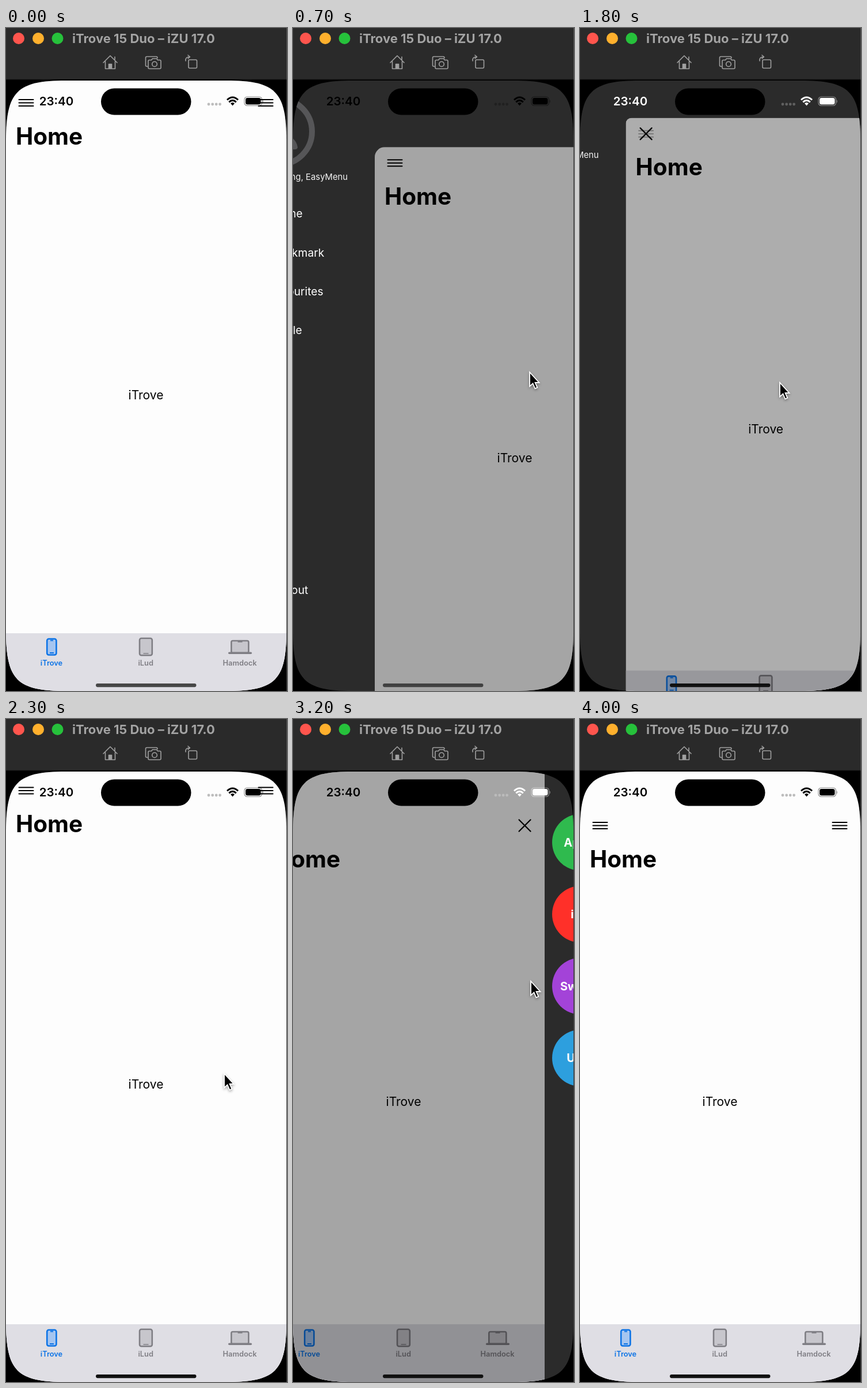
An HTML page that plays this animation: 488 px wide and 1148 px high, repeating every 4.1 s.

```html
<!DOCTYPE html>
<html lang="en">
<head>
<meta charset="utf-8">
<title>Side menu demo</title>
<style>
  html, body { margin: 0; width: 100%; height: 100%; overflow: hidden; background: #000; }
  svg { display: block; font-family: Inter, Roboto, sans-serif; }
  .line { fill: none; stroke-linecap: round; stroke-linejoin: round; }
</style>
</head>
<body>
<svg id="stage" width="488" height="1148" viewBox="0 0 488 1148"></svg>
<script>
const LOOP = 4100, STEP = 100, OPEN = 245, TOP = 91;

// Text placed by the middle of its capitals.
const text = (x, y, size, str, attrs = '') =>
  `<text x="${x}" y="${y + size * .364}" font-size="${size}" ${attrs}>${str}</text>`;
const mid = 'text-anchor="middle"';
const disc = (x, y, r, fill) => `<circle cx="${x}" cy="${y}" r="${r}" fill="${fill}"/>`;
const box = (x, y, w, h, r, attrs = '') =>
  `<rect x="${x}" y="${y}" width="${w}" height="${h}" rx="${r}" ${attrs}/>`;

const windowBar = `
  ${box(0, 0, 488, 89, 0, 'fill="#2a2a2a"')}
  ${box(0, 88.5, 488, 1, 0, 'fill="#1a1a1a"')}
  ${disc(22, 18, 10, '#ff554d')}${disc(56, 18, 10, '#ffb02d')}${disc(89.5, 18, 10, '#26c13b')}
  ${text(115, 18, 22, 'iTrove 15 Duo – iZU 17.0', 'fill="#a3a3a3" font-weight="700"')}
  <g class="line" stroke="#a0a0a0" stroke-width="1.6">
    <path d="M169 60 181 48 193 60M172.500 58V70.500H189.500V58M189 50V55"/>
    <path d="M178.500 70V62.500H183.500V70Z" fill="#a0a0a0"/>
    <path d="M246 66.500H244.500Q242.500 66.500 242.500 64.500V51.500Q242.500 49.500 244.500 49.500H261Q263 49.500 263 52"/>
    <path d="M249 55.500H252.500L254.500 53H261.500L263.500 55.500H267Q269 55.500 269 57.500V68.500Q269 70.500 267 70.500H249Q247 70.500 247 68.500V57.500Q247 55.500 249 55.500Z"/>
    <circle cx="258" cy="62.500" r="4.300"/>
    ${box(317, 55, 14.5, 14.5, 2)}
    <path d="M312 57Q311 50 319 50M316 47 319.500 50 316 53"/>
  </g>`;

const row = (x, y, label) => text(x, y, 19.2, label, 'fill="#fff"');
const leftMenu = `
  <circle cx="79" cy="263" r="57" fill="none" stroke="#565658" stroke-width="10"/>
  <ellipse cx="79" cy="244" rx="15.500" ry="17" fill="#565658"/>
  <path d="M47 290C49 275 64 266.500 79 266.500S109 275 111 290Q111 294 106 294H52Q47 294 47 290Z" fill="#565658"/>
  ${text(16.5, 341.5, 14.8, 'Good Morning, EasyMenu', 'fill="#f4f4f4"')}
  <g fill="#ff3b30">
    <path class="line" d="M21 406 34.500 394.500 48 406" style="stroke:#ff3b30;stroke-width:2.600"/>
    <path d="M24 407 34.500 398 45 407V417Q45 419 43 419H37.500V410H31.500V419H26Q24 419 24 417ZM41 394H45V401L41 398Z"/>
    <path d="M33.300 485V464Q27 459.500 20 463V483Q27 480.500 33.300 485ZM35.200 485V464Q41.500 459.500 48.500 463V483Q41.500 480.500 35.200 485Z"/>
    <path d="M32.300 551C25 546 19.800 541 19.800 535 19.800 527 29 525.500 32.300 532 35.600 525.500 44.800 527 44.800 535 44.800 541 39.600 546 32.300 551Z"/>
    <circle cx="31.500" cy="607" r="11.300" fill="none" stroke="#ff3b30" stroke-width="2.200"/>
    <circle cx="31.500" cy="604" r="4.300"/>
    <path d="M23.500 614Q31.500 606 39.500 614Q31.500 620 23.500 614Z"/>
    ${box(20, 1044, 21, 26, 3)}
    <path class="line" d="M31 1057H41" style="stroke:#2b2b2b;stroke-width:2"/>
    <path class="line" d="M41 1057H48M44 1053 48 1057 44 1061" style="stroke:#ff3b30;stroke-width:2"/>
  </g>
  ${row(66, 405, 'Home')}${row(65.5, 473, 'Bookmark')}${row(61.5, 539.5, 'Favourites')}
  ${row(60.5, 606.5, 'Profile')}${row(66, 1057, 'Logout')}`;

const rightMenu = [['Aphel', '#2fba4e'], ['iZU', '#ff3029'], ['SwiftUI', '#a343d8'], ['UIKit', '#2d9fde']]
  .map(([name, fill], i) => disc(62, 213.5 + i * 124.5, 49, fill) +
    text(62, 213.5 + i * 124.5, 20, name, `${mid} fill="#fff" font-weight="700"`)).join('');

// A hamburger and its cross share one place in the header.
const burger = (id, x) => `
  <path id="${id}Bars" class="line" stroke="#000" stroke-width="2" d="M${x - 12.5} -5.500h25m-25 5.500h25m-25 5.500h25"/>
  <path id="${id}Cross" class="line" stroke="#000" stroke-width="2.200" d="M-10 -10 10 10M10 -10-10 10"/>`;

const tabLabel = (x, name) => text(x, 1008.5, 12.8, name, `${mid} font-weight="600" stroke="none"`);
const card = `
  <g id="card"><g clip-path="url(#cardClip)">
    <rect width="488" height="1057" fill="#fdfdfd"/>
    <g id="header">${burger('left', 35)}${burger('right', 451)}
      ${text(17, 57.5, 40.5, 'Home', 'font-weight="700"')}</g>
    <g id="label">${text(243, 0, 21, 'iTrove', mid)}</g>
    ${box(0, 957, 488, 100, 0, 'fill="#dfdee4"')}
    <g stroke="#0b73e6" fill="#0b73e6" class="tab">
      ${box(71.2, 966.7, 16.2, 27.8, 3, 'fill="#a5c5f0" stroke-width="2.600"')}
      <path d="M77 969.500h5M76 991h7" stroke-width="1.800"/>${tabLabel(79, 'iTrove')}
    </g>
    <g stroke="#7f7e84" fill="#7f7e84">
      ${box(232, 965.7, 21.8, 29.6, 3, 'fill="#c7c6cc" stroke-width="2.600"')}
      <path d="M238.500 992h9" stroke-width="1.600"/>${tabLabel(242.7, 'iLud')}
      ${box(391.3, 970, 30, 21, 2.5, 'fill="#c7c6cc" stroke-width="2.600"')}
      <path d="M402.500 971.500h8" stroke-width="2.400"/>
      ${box(386, 989.5, 41, 3.6, 1.8, 'stroke="none"')}${tabLabel(406, 'Hamdock')}
    </g>
    <rect id="shade" width="488" height="1057"/>
  </g></g>`;

const status = `
  ${box(165, 104.5, 156.5, 46, 23)}
  <g id="clock">${text(87.5, 127, 20.5, '23:40', mid + ' font-weight="600"')}</g>
  <g id="signal">
    <g opacity=".25">${[352, 358.7, 365.2, 371.6].map(x => `<circle cx="${x}" cy="132" r="2.400"/>`).join('')}</g>
    <path d="M393.500 134.500 390 130.500Q393.500 127.500 397 130.500Z"/>
    <path class="line" style="stroke:currentColor;stroke-width:3;stroke-linecap:butt" d="M384 124.500Q393.500 115.500 403 124.500M387.300 128.300Q393.500 122.500 399.700 128.300"/>
    ${box(414, 119, 30.5, 15.5, 5, 'fill="none" stroke="currentColor" opacity=".45" stroke-width="1.200"')}
    ${box(416, 121, 26.5, 11.5, 3.4)}
    <path d="M445.800 124V130Q448 127 445.800 124Z" opacity=".5"/>
  </g>
  ${box(156, 1135, 174.5, 6.2, 3.1, 'id="bar"')}`;

const stage = document.getElementById('stage');
stage.innerHTML = `
  <defs>
    <clipPath id="screen"><path d="M0 195C0 110 19 91 104 91H383C468 91 487 110 487 195V1044C487 1129 468 1148 383 1148H104C19 1148 0 1129 0 1044Z"/></clipPath>
    <clipPath id="cardClip"><rect id="cardShape" width="488" height="1057"/></clipPath>
  </defs>
  <rect width="488" height="1148"/>
  ${windowBar}
  <g clip-path="url(#screen)">
    <rect y="90" width="488" height="1058" fill="#2b2b2b"/>
    <g id="leftMenu">${leftMenu}</g><g id="rightMenu">${rightMenu}</g>
    ${card}${status}
  </g>
  ${box(487, 0, 1, 1148, 0, 'fill="#777" opacity=".5"')}
  <path id="cursor" d="M1 1V25.500L6.500 20.500 10.300 29.300 14.300 27.600 10.500 19H17.500Z"
    stroke="#fff" stroke-width="1.800" style="filter:drop-shadow(0 2px 2px rgba(0,0,0,.35))"/>`;

const el = {};
stage.querySelectorAll('[id]').forEach(e => el[e.id] = e);
const set = (id, name, value) => el[id].setAttribute(name, value);
const move = (id, x, y) => set(id, 'transform', `translate(${x} ${y})`);

const linear = p => p, easeOut = p => 1 - (1 - p) ** 3, easeIn = p => p * p;
// Moves are [start, end, value, easing]; each begins at the last value.
function tween(t, value, moves) {
  for (const [a, b, to, ease = linear] of moves) {
    if (t <= a) break;
    value += (to - value) * ease(Math.min(1, (t - a) / (b - a)));
  }
  return value;
}

const slide = [[600, 700, 142], [700, 1100, OPEN, easeOut], [1700, 2020, 0, easeOut],
  [2400, 2800, -115], [2800, 3000, -124, easeOut], [3100, 3490, 0, easeOut]];
const dim = [[600, 700, 1], [1700, 2020, 0, easeIn], [2400, 2600, 1], [3200, 3500, 0]];
const leftIcon = [[750, 950, 1], [1700, 2020, 0]];
const rightIcon = [[2700, 2900, 1], [3200, 3500, 0]];
const pointer = [[100, 394, 640], [600, 270, 600], [700, 410, 595], [1300, 352, 620], [1800, 346, 613],
  [2300, 378, 613], [2450, 455, 600], [2800, 340, 520], [3000, 412, 453], [3200, 412, 453], [3600, 440, 440]];
const track = axis => pointer.slice(1).map((p, i) => [pointer[i][0], p[0], p[axis]]);
const pointerX = track(1), pointerY = track(2);

function icon(id, amount, openX, midX) {
  set(id + 'Bars', 'opacity', 1 - amount);
  set(id + 'Cross', 'opacity', Math.min(1, amount * 1.4));
  move(id + 'Cross', amount < 1 ? midX : openX, 0);
}

function draw(t) {
  const x = tween(t, 0, slide);
  const inset = t <= 600 ? 11 : t < 2100 ? 0 : t < 2500 ? 5.5 : 66;
  move('card', x, TOP + Math.max(0, x) * .812);
  set('cardShape', 'rx', Math.abs(x) * .122);
  move('leftMenu', x - OPEN, (x - OPEN) * (t < 1700 ? .812 : .735));
  move('rightMenu', 488 + x, 0);
  move('header', 0, 27.5 + inset);
  move('label', 0, 538.5 + inset / 2);
  set('shade', 'opacity', .35 * tween(t, 0, dim));
  icon('left', tween(t, 0, leftIcon), 32, 35);
  icon('right', tween(t, 0, rightIcon), 453.5, 451);

  const leftOpen = t >= 800 && t < 1900, rightOpen = t >= 2700 && t < 3300;
  const signal = leftOpen || rightOpen ? '#fff' : '#000';
  set('clock', 'fill', leftOpen ? '#fff' : '#000');
  set('signal', 'fill', signal);
  set('signal', 'color', signal);
  set('bar', 'fill', t < 1700 ? 'rgba(55,55,55,.9)' : '#111');

  set('cursor', 'visibility', t >= 100 && t < 3600 ? 'visible' : 'hidden');
  move('cursor', tween(t, 394, pointerX), tween(t, 640, pointerY));
}

const start = performance.now();
function tick() {
  const t = (performance.now() - start + 5) % LOOP;
  draw(Math.floor(t / STEP) * STEP);
  requestAnimationFrame(tick);
}
tick();
</script>
</body>
</html>
```
